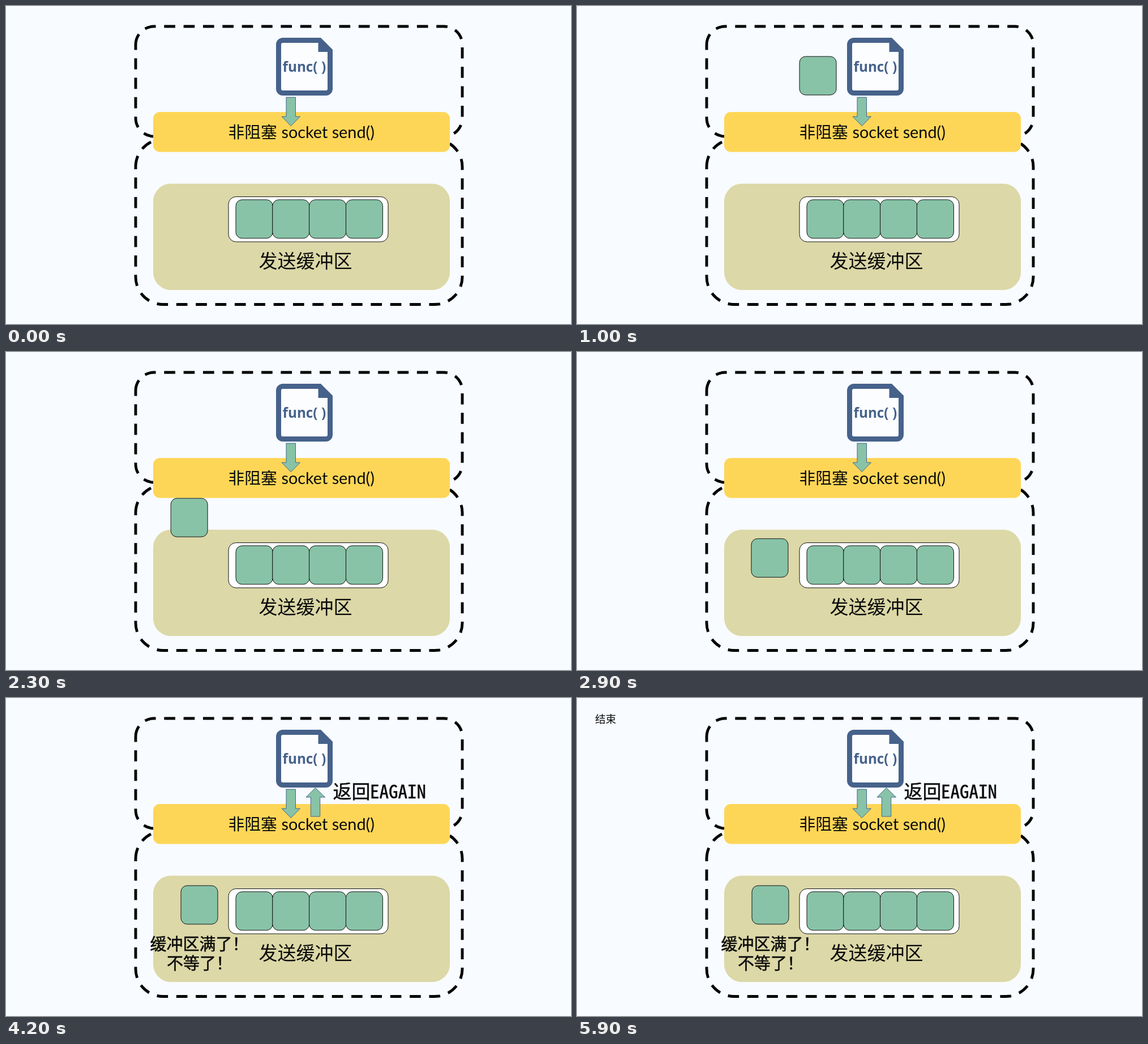
Animation, 998 px wide and 561 px high, one loop 6 s. Source, as an HTML page:

```html
<!DOCTYPE html>
<html lang="zh-CN">
<head>
<meta charset="utf-8">
<title>Non-blocking send</title>
<style>
html, body { margin: 0; width: 100%; height: 100%; overflow: hidden; background: #f8fbff; }
svg { display: block; width: 998px; height: 561px; }
text { font-family: "Noto Sans CJK SC", "Noto Sans CJK", sans-serif; fill: #0a0a0a; white-space: pre; }
.dash { fill: none; stroke: #000; stroke-width: 4.9; stroke-dasharray: 19.63 14.72; }
.cell { fill: #88c3a7; stroke: #111; stroke-width: 1; }
.arrow { fill: #88c3a7; stroke: #41658f; stroke-width: 1; }
.latin { font-family: Lato, sans-serif; }
.code { font-family: "Open Sans", sans-serif; font-weight: 700; fill: #46628b; }
.mono { font-family: "Noto Sans Mono CJK SC", "Noto Sans Mono CJK", "Noto Sans Mono", monospace; }
.thin { font-weight: 300; }
.heavy text { stroke: #0a0a0a; stroke-width: 0.5; }
</style>
</head>
<body>
<svg viewBox="0 0 998 561">
  <rect width="998" height="561" fill="#f8fbff"/>
  <g id="frames"></g>
  <rect x="260" y="187" width="524" height="70.5" rx="11.7" fill="#fed657"/>
  <rect x="260" y="313.5" width="524" height="187.5" rx="31.2" fill="#dcd8a7"/>
  <rect x="393" y="336.5" width="282" height="79.5" rx="13.2" fill="#fff" stroke="#111"/>
  <g id="cells"></g>
  <text class="thin" x="446.5" y="462" font-size="33">发送缓冲区</text>
  <text class="thin" x="392.5" y="233" font-size="28.8">非阻塞</text>
  <text class="latin" x="486.5" y="232.5" font-size="28.8">socket send()</text>

  <path fill="#46628b" d="M489 56H556L577 77V146a12 12 0 0 1-12 12H489a12 12 0 0 1-12-12V68a12 12 0 0 1 12-12Z"/>
  <path fill="#fcfdff" d="M489 65H551.5V81H568V146a3 3 0 0 1-3 3H489a3 3 0 0 1-3-3V68a3 3 0 0 1 3-3Z"/>
  <text class="code" x="488.5" y="116" font-size="24.3">func( )</text>
  <path class="arrow" d="M495 161H511.5V195H519.5L503.2 211.5L487 195H495Z"/>

  <rect id="packet" class="cell" width="65" height="68" rx="10.9"/>
  <g id="full" class="heavy" font-size="29">
    <text x="254.5" y="445">缓冲区满了！</text>
    <text x="284" y="479">不等了！</text>
  </g>
  <g id="reply" class="heavy" font-size="33">
    <path class="arrow" d="M538.3 209V175H530L546.5 158.5L563.5 175H554.7V209Z"/>
    <text x="577.5" y="176.5">返回</text>
    <text class="mono" x="643" y="176.5">EAGAIN</text>
  </g>
  <text id="end" x="32" y="43.5" font-size="18.6">结束</text>
</svg>
<script>
const LOOP = 6000, STEP = 100;
const NS = "http://www.w3.org/2000/svg";
const $ = id => document.getElementById(id);

function add(parent, tag, attrs) {
  const el = document.createElementNS(NS, tag);
  for (const k in attrs) el.setAttribute(k, attrs[k]);
  parent.appendChild(el);
}

// Rounded outline that starts on the left edge so the dashes run clockwise from there.
function outline(x, y, w, h) {
  const r = Math.min(w, h) / 6;
  const arc = (dx, dy) => `a${r} ${r} 0 0 1 ${dx} ${dy}`;
  return `M${x} ${y + r}${arc(r, -r)}H${x + w - r}${arc(r, r)}` +
    `V${y + h - r}${arc(-r, r)}H${x + r}${arc(-r, -r)}Z`;
}

add($("frames"), "path", { class: "dash", d: outline(229, 36, 577, 194) });
add($("frames"), "path", { class: "dash", d: outline(229, 235, 577, 291.5) });
for (let i = 0; i < 4; i++) {
  add($("cells"), "rect", { class: "cell", x: 406 + i * 64.8, y: 341.8, width: 65, height: 68, rx: 10.9 });
}

const ramp = (t, start, length) => Math.min(1, Math.max(0, (t - start) / length));
const ease = u => u < 0.5 ? 2 * u * u : 1 - 2 * (1 - u) ** 2;
const bezier = (a, b, c, d, u) => {
  const v = 1 - u;
  return a * v ** 3 + 3 * b * v * v * u + 3 * c * v * u * u + d * u ** 3;
};
const fade = (id, t, start) => $(id).setAttribute("opacity", ramp(t, start, 500));

function draw(t) {
  const u = ease(ramp(t, 1092, 1920));
  const x = bezier(393, 332, 255, 309, u);
  const y = bezier(89, 132, 250, 331, u);
  $("packet").setAttribute("transform", `translate(${x.toFixed(2)} ${y.toFixed(2)})`);
  fade("packet", t, 500);
  fade("full", t, 3000);
  fade("reply", t, 3550);
  fade("end", t, 4200);
}

const origin = performance.now();
function tick() {
  const t = (performance.now() - origin) % LOOP;
  draw(Math.floor(t / STEP) * STEP);
  requestAnimationFrame(tick);
}
draw(0);
requestAnimationFrame(tick);
</script>
</body>
</html>
```
